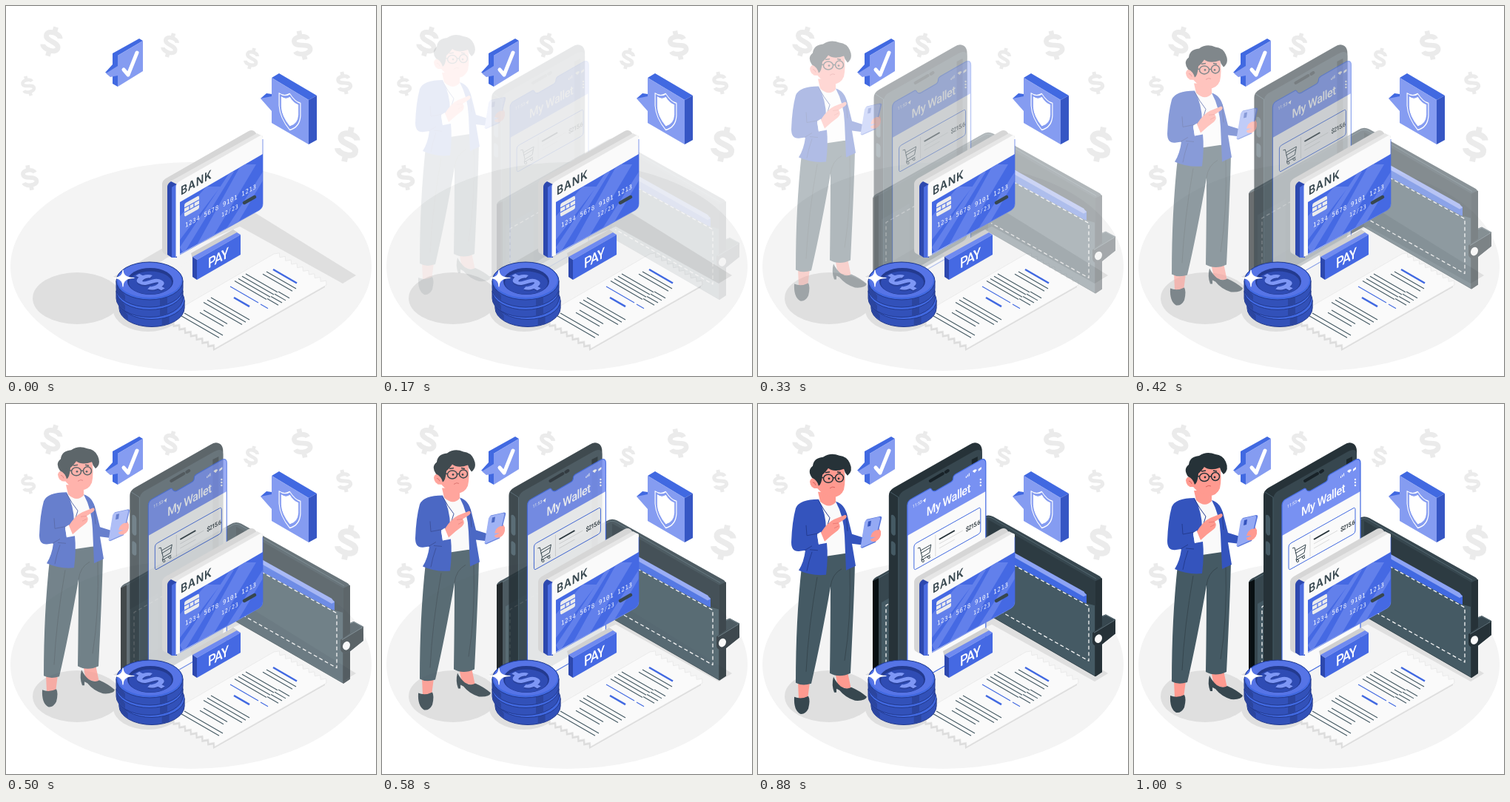
Animation, 500 px wide and 500 px high, one loop 1.04 s. Source, as an HTML page:

```html
<!DOCTYPE html>
<html lang="en">
<head>
<meta charset="utf-8">
<title>Mobile wallet</title>
<style>
html, body { margin: 0; width: 100%; height: 100%; overflow: hidden; background: #fff; }
svg { display: block; width: 100vw; height: 100vh; }
text { font-family: Roboto, Inter, sans-serif; }
.mono { font-family: "DejaVu Sans Mono", monospace; fill: #fff; letter-spacing: .8px; }
</style>
</head>
<body>
<svg viewBox="0 0 500 500" fill="none" stroke-linejoin="round">
<defs>
  <path id="dollar" d="M8.500-6C7-12-8.500-13-8.500-6C-8.500 2 9 -2 9 6C9 13-8 12-9.500 6M0-18V-11M0 11V18" stroke-width="6"/>
  <clipPath id="face"><path d="M235 265L347 200V267Q347 273 342 276L235 335Z"/></clipPath>
  <g id="coin">
    <path d="M-45 0V10A45 25.500 0 0 0 45 10V0Z" fill="#3251b9" stroke="#22398c"/>
    <path d="M-45 3V9A45 25.500 0 0 0-33 26V20ZM14 24V34L24 32V22Z" fill="#2b459f"/>
    <ellipse rx="45" ry="25.500" fill="#4169e1" stroke="#22398c"/>
  </g>
</defs>

<ellipse cx="250" cy="352" rx="244" ry="141" fill="#f4f4f4"/>
<g id="signs" stroke="#ebebeb"></g>
<g fill="#dfdfdf">
  <ellipse cx="96" cy="395" rx="60" ry="35"/>
  <path d="M145 366L214 326 318 268 473 364 455 375 316 298 218 340 165 374Z"/>
  <ellipse cx="192" cy="411" rx="47" ry="29"/>
</g>
<path d="M185 384L316 300 362 333 222 412Z" fill="#f4f4f4"/>
<g id="receipt"></g>

<g id="wallet">
  <path d="M155 241Q156 237 163 234L303 155Q310 150 318 154L461 234Q465 236 465 242V364L456 370 310 286 164 370 155 364Z" fill="#37474f"/>
  <path d="M155 241L163 237V369L155 364Z" fill="#080f12"/>
  <path d="M163 237L306 156Q312 153 318 157L457 238" stroke="#52666f"/>
  <path d="M311 158L456 241V370L311 286Z" fill="#2d3b42"/>
  <path d="M320 189L345 203 444 259V272L320 206Z" fill="#4169e1"/>
  <path d="M320 188L440 255 444 260 440 262 320 194Z" fill="#8da3f4"/>
  <path d="M311 200L440 270 455 274V369L311 286Z" fill="#455a64"/>
  <path d="M167 270L205 248V346L167 368Z" fill="#455a64"/>
  <path d="M173 352V274L215 250M330 211L447 275V349L315 275" stroke="#f5f5f5" stroke-width="1.300" stroke-dasharray="5 3.500"/>
  <path d="M456 241L465 237V364L456 370Z" fill="#263238"/>
  <path d="M452 311L465 302V288L470 286 483 293V312L463 328Q453 331 452 323Z" fill="#37474f"/>
  <path d="M452 311L483 293V312L463 328Q453 331 452 323Z" fill="#263238"/>
  <path d="M454 311L482 294M465 289L470 287 482 293" stroke="#60737c"/>
  <ellipse cx="460" cy="319" rx="4.800" ry="6" transform="rotate(25 460 319)" fill="#fafafa"/>
</g>

<g id="phone">
  <path d="M175 124Q175 117 182 113L284 55Q291 50 297 54Q301 57 301 64V308Q301 314 295 318L195 376 175 364Z" fill="#263238"/>
  <path d="M188 130Q188 122 194 118L286 66Q301 57 301 68V308Q301 314 295 318L195 376 188 372Z" fill="#37474f"/>
  <path d="M177 119L188 126V366" stroke="#455a64"/>
  <path d="M178 151Q178 149 181 150 184 152 184 155V176Q183 179 180 177 178 175 178 173ZM178 187Q178 184 181 186 184 188 184 190V203Q183 206 180 204 178 203 178 201Z" fill="#455a64"/>
  <path d="M231 104L248 94M252 92L255 90" stroke="#182228" stroke-width="4" stroke-linecap="round"/>
  <path d="M287 75L295 71V300L287 305Z" fill="#1c272c"/>
</g>
<g id="screen">
  <path id="plate" d="M200 137Q200 131 206 128L229 115Q232 113 233 116 235 119 239 117L258 106Q262 104 262 100 262 97 265 95L300 75Q306 73 306 80V322L200 383Z" fill="#fafafa"/>
  <path d="M200 137Q200 131 206 128L229 115Q232 113 233 116 235 119 239 117L258 106Q262 104 262 100 262 97 265 95L300 75Q306 73 306 80V118L200 178Z" fill="#7891f2"/>
  <use href="#plate" fill-opacity="0" stroke="#4169e1" stroke-width="1.200"/>
  <g fill="#fff">
    <text transform="matrix(.87 -.49 0 1 226 152)" font-size="16.500" font-weight="500" letter-spacing="-.5">My Wallet</text>
    <text transform="matrix(.87 -.49 0 1 207 141)" font-size="6">11:53</text>
    <path d="M220 132L225 127 224 133 222 131ZM279 100V98L280 97V100ZM281 99V96L282 95V98ZM283 98V94L284 93V97ZM288 91Q291 87 294 89L291 93ZM296 88L300 85V88L296 91Z"/>
    <circle cx="299" cy="102" r="1.200"/><circle cx="299" cy="106" r="1.200"/><circle cx="299" cy="110" r="1.200"/>
  </g>
  <path d="M209 193Q209 190 212 188L296 141Q299 139 299 143V171Q299 174 296 176L212 223Q209 225 209 221Z" fill="#fafafa" stroke="#4169e1"/>
  <path d="M214 195L217 194 220 207 230 201 232 190 218 198M220 207L219 211 231 204M218 202L231 194" stroke="#37474f"/>
  <circle cx="221" cy="212" r="1.600" stroke="#37474f"/><circle cx="229" cy="207" r="1.600" stroke="#37474f"/>
  <path d="M238 177V206M243 189L275 171M243 195L264 183" stroke="#dcdcdc"/>
  <path d="M243 183L264 171" stroke="#263238" stroke-width="2"/>
  <text transform="matrix(.87 -.49 0 1 279 173)" font-size="8.500" font-weight="500" letter-spacing="-.8" fill="#263238">$215.6</text>
</g>

<g id="card">
  <path d="M211 241Q211 236 216 233L328 169Q334 166 338 172V260L218 337 213 334Q211 333 211 329Z" fill="#d6d6d6"/>
  <path d="M222 237L339 172 347 176V185L231 246Z" fill="#e6e6e6"/>
  <path d="M218 245Q218 240 223 237L231 241V340H224L218 336Z" fill="#2d48ae"/>
  <path d="M224 245L230 241V340H224Z" fill="#4c6de0"/>
  <path d="M229.500 244Q230 239 236 236L342 176Q347 173 347 180V267Q347 273 342 276L236 336 229.500 339Z" fill="#fafafa"/>
  <g clip-path="url(#face)">
    <path d="M235 200H347V340H235Z" fill="#4569e3"/>
    <path d="M235 284L271 244H290L235 316ZM254 330L318 214H338L276 318ZM292 310L347 224V236L306 305ZM235 326L303 224H308L240 335Z" fill="#6f8af0" opacity=".7"/>
  </g>
  <path d="M347 180V267Q347 273 342 276L235 336" stroke="#4569e3" stroke-width=".7"/>
  <text transform="matrix(.87 -.49 0 1 236 256)" font-size="16" font-weight="600" letter-spacing=".8" fill="#37474f" style="font-family:Inter,sans-serif">BANK</text>
  <path d="M241 270Q241 267 243 266L259 257Q261 256 261 259V272Q261 274 259 275L243 284Q241 285 241 282Z" fill="#ececec"/>
  <path d="M241 273L261 262M241 279L261 268M248 270V276M254 266V272" stroke="#5878e8" stroke-width="1.300"/>
  <text class="mono" transform="matrix(.87 -.48 0 1 242 299.500)" font-size="8.400">1234 5678 9101 1213</text>
  <text class="mono" transform="matrix(.87 -.48 0 1 291 285.500)" font-size="7.600">12/23</text>
  <path d="M322 266L336 258" stroke="#37474f" stroke-width="4.500" stroke-linecap="round"/>
</g>

<g id="pay">
  <path d="M250 334L307 302 313 306 252 342Z" fill="#d0d0d0"/>
  <path d="M252 339L312 306 317 309 258 343Z" fill="#6f8af0"/>
  <path d="M252 339L258 343V370L252 366Z" fill="#2d48ae"/>
  <path d="M258 343L317 309V336L258 370Z" fill="#4569e3"/>
  <text transform="matrix(.87 -.49 0 1 273 355)" font-size="19.500" font-weight="500" letter-spacing="-1" fill="#fff">PAY</text>
</g>

<use href="#coin" transform="translate(197 398) scale(.98 1)"/>
<use href="#coin" transform="translate(194 385)"/>
<use href="#coin" transform="translate(194 371.500)"/>
<ellipse cx="194" cy="370.500" rx="43" ry="23.500" fill="#5674e6"/>
<ellipse cx="195" cy="372" rx="31" ry="18" fill="#233a8f"/>
<ellipse cx="195" cy="374" rx="29" ry="15.500" fill="#2f4cb4"/>
<use href="#dollar" transform="matrix(.82 -.47 .96 .55 195 375)" stroke="#2a439f"/>
<use href="#dollar" transform="matrix(.82 -.47 .96 .55 195 373)" stroke="#7e97f5"/>
<circle cx="158" cy="368" r="5" fill="#fff" opacity=".35"/>
<path d="M158 357Q158 367.500 173 367.500 158 367.500 158 379 158 367.500 145 367.500 158 367.500 158 357Z" fill="#fff" stroke="#fff" stroke-width="1.200"/>

<g id="man">
  <path d="M54 374H70L67 397H55ZM104 360H121L126 384 108 380Z" fill="#ff9a90"/>
  <path d="M49 394Q58 398 68 393 71 398 68 410 64 418 57 417 48 412 49 394ZM102 367Q106 375 112 380 120 385 126 381 138 386 147 394 145 400 131 399 118 395 110 385L106 383V388H103Q99 378 102 367Z" fill="#37474f"/>
  <path d="M59 218L92 200H127L131 213Q130 260 125 362 110 369 97 362 98 300 98 245 85 320 72 376 60 380 51 375 51 290 59 218Z" fill="#455a64"/>
  <path d="M98 245Q100 228 113 221M124 220Q126 290 117 345M80 232Q68 300 65 360" stroke="#37474f"/>
  <path d="M85 128L106 133 118 148 119 200 92 204Z" fill="#fafafa"/>
  <path d="M81 117H105V131Q96 141 84 130Z" fill="#ff9a90"/>
  <path d="M105 130Q117 133 121 150L127 174 143 179V189L127 187 132 217 119 223 117 176Q116 150 105 130Z" fill="#3454bd"/>
  <path d="M82 127Q56 127 51 139 46 157 45 185 45 199 57 197L64 196Q62 212 55 223 73 231 92 229 95 205 93 186L82 188 80 176 92 168Q92 146 82 127Z" fill="#3454bd"/>
  <path d="M65 162L66 176 82 173M63 196L73 190M82 129Q89 142 97 152L92 168M70 195L81 196M119 146L121 170M73 198Q68 212 66 224" stroke="#243c91"/>
  <path d="M80 174L85 171 90 184 82 188Z" fill="#fff"/>
  <path d="M85 172Q94 158 103 154L118 148Q122 150 117 154L109 159Q113 164 108 169L99 176 90 184Z" fill="#ff9a90"/>
  <path d="M101 160L109 159M103 166L109 163" stroke="#e6736e" stroke-width=".8"/>
  <path d="M142 180L151 175 153 166 162 165Q168 169 165 178 161 185 150 186L142 188Z" fill="#ff9a90"/>
  <path d="M147 154L165 150Q168 150 167 153L159 185 141 193Q138 193 139 190L145 157Z" fill="#5876dc"/>
  <path d="M146 155L163 151Q166 151 165 154L158 184 140 192Q138 192 139 189L144 158Z" fill="#94a9f4"/>
  <path d="M149 157L153 156 152 163 148 164Z" fill="#3454bd"/>
  <path d="M154 173Q160 166 166 170 167 180 159 184 152 185 152 181L159 178 152 178Z" fill="#ff9a90"/>
  <path d="M77 90Q84 78 102 79L116 84Q119 101 116 114 112 124 101 124 88 122 80 112L75 112Z" fill="#ff9a90"/>
  <path d="M80 101Q72 95 70 103 71 113 80 112Z" fill="#ff9a90"/>
  <path d="M73 98Q66 88 74 82 75 71 88 70 98 63 110 68 120 69 124 78 129 89 121 95 117 91 116 86 103 91 95 85 91 91 87 94 86 107 82 109 80 101 73 98Z" fill="#263238"/>
  <path d="M74 104Q77 104 78 108M97 112Q101 109 104 111" stroke="#d9625f"/>
  <g stroke="#263238" stroke-width="1.500">
    <ellipse cx="95" cy="99" rx="6.500" ry="5.500"/><ellipse cx="110" cy="98" rx="5.500" ry="5.500"/>
    <path d="M101 98H105M88 98L80 96M91 91L97 90M107 90L112 91"/>
  </g>
  <circle cx="96" cy="99" r="1.400" fill="#263238"/><circle cx="109" cy="99" r="1.400" fill="#263238"/>
</g>

<g id="check">
  <path d="M144 64L180 44 185 47 151 67V109L144 105V93L134 90 144 79Z" fill="#4169e1"/>
  <path d="M151 67L185 47V88L151 109V94L141 96 135 91 151 81Z" fill="#859cf1"/>
  <path d="M159 86L165 93 177 63" stroke="#fff" stroke-width="5" stroke-linecap="round"/>
</g>
<g id="shield">
  <path d="M359 97L369 91 420 121 409 127ZM344 125L352 118 359 119V125Z" fill="#4169e1"/>
  <path d="M409 127L420 121V181L409 187Z" fill="#3656c4"/>
  <path d="M359 97L409 127V187L359 158V142L344 125 359 122Z" fill="#859cf1"/>
  <g transform="matrix(.9 .42 0 1 383.500 141.500)">
    <path id="crest" d="M0-23Q8-15 16-17V0Q15 16 0 26Q-15 16-16 0V-17Q-8-15 0-23Z" stroke="#fff" stroke-width="1.300"/>
    <use href="#crest" transform="scale(.78)" fill="#fff"/>
  </g>
</g>
</svg>
<script>
const $ = id => document.getElementById(id);

// x, y, scale, tilt
$('signs').innerHTML = [
  [62, 48, 1.13, 16], [222, 53, .93, 16], [332, 71, .8, 14], [400, 53, 1.1, -12],
  [30, 108, .76, -16], [457, 104, .85, -12], [462, 187, 1.32, 12], [32, 232, .95, -10]
].map(([x, y, s, r]) =>
  `<use href="#dollar" transform="translate(${x} ${y}) rotate(${r}) scale(${s})"/>`).join('');

// Stepped paper edge between two corners
function tear(x0, y0, x1, y1, n) {
  const at = k => [x0 + (x1 - x0) * k / n, y0 + (y1 - y0) * k / n];
  let d = '';
  for (let i = 0; i < n; i++) {
    const [x, y] = at(i + .5);
    d += `L${x + 3.5} ${y - 3.5}L${at(i + 1)}`;
  }
  return d;
}
const paper = 'M362 335' + tear(362, 335, 433, 377, 9) + 'L282 463' + tear(282, 463, 212, 422, 9) + 'Z';

// Parallel printed rows: start, width, row count
const rows = (x, y, w, n, color = '#455a64', width = 1.1) => {
  let d = '';
  for (let i = 0; i < n; i++) d += `M${x - 5 * i} ${y + 3.2 * i}l${w} ${w * .577}`;
  return `<path d="${d}" stroke="${color}" stroke-width="${width}"/>`;
};
const blue = '#4169e1';
$('receipt').innerHTML =
  `<path d="${paper}" fill="#dcdcdc" transform="translate(-2 3)"/>` +
  `<path d="${paper}" fill="#fafafa" stroke="#e6e6e6" stroke-width=".7"/>` +
  rows(361, 356, 32, 1, blue, 2.5) + rows(352, 359, 40, 2) +
  rows(324, 362, 43, 4) + rows(303, 379, 38, 1, blue) +
  rows(308, 394, 21, 1, blue, 2.5) + rows(368, 386, 15, 4) + rows(344, 403, 10, 1, blue) +
  rows(277, 394, 52, 3) + rows(267, 411, 32, 2) + rows(241, 415, 52, 2);

// Ease curve (.36, -.01, .5, 1.38), solved by bisection
const curve = (u, a, b) => 3 * a * u * (1 - u) ** 2 + 3 * b * u * u * (1 - u) + u ** 3;
function ease(t) {
  let lo = 0, hi = 1;
  for (let i = 0; i < 24; i++) {
    const mid = (lo + hi) / 2;
    if (curve(mid, .36, .5) < t) lo = mid; else hi = mid;
  }
  return curve(hi, -.01, 1.38);
}

function slide(id, dx, dy, p) {
  const g = $(id), rest = 1 - p;
  g.setAttribute('transform', `translate(${dx * rest} ${dy * rest})`);
  g.setAttribute('opacity', Math.max(0, Math.min(1, p)));
}

let start;
function draw(now) {
  start ??= now;
  const p = ease(Math.min(1, (now - start) % 1040 / 1000));
  slide('man', 0, -30, p);
  slide('phone', -30, 0, p);
  slide('screen', -30, 0, p);
  slide('wallet', 0, 30, p);
  requestAnimationFrame(draw);
}
requestAnimationFrame(draw);
</script>
</body>
</html>
```
